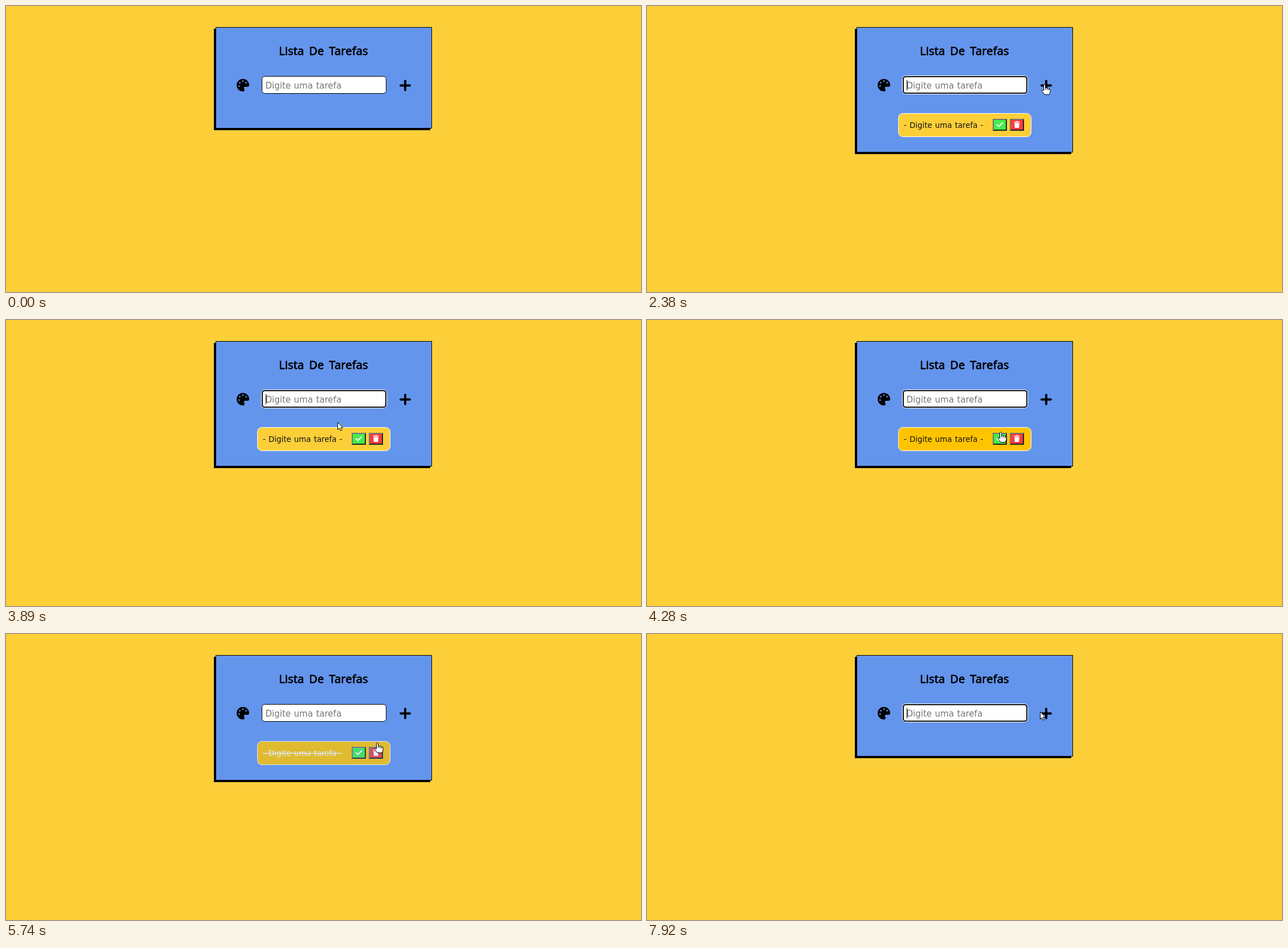
Recreate the animation shown at these times as an HTML page. Size 1115 by 502 pixels, loop 7.99 s.

```html
<!DOCTYPE html>
<html lang="pt">
<head>
<meta charset="utf-8">
<title>Lista De Tarefas</title>
<style>
  html, body { margin: 0; height: 100%; overflow: hidden; background: #fccf39; }
  svg { display: block; width: 1115px; height: 502px; }
  text { font-family: "DejaVu Sans", sans-serif; }
  .title { font: 20px "Open Sans", sans-serif; letter-spacing: .2px; word-spacing: 3.5px; stroke: #000; stroke-width: .8; stroke-linejoin: round; }
  .placeholder { font-size: 15px; word-spacing: .8px; fill: #757575; }
  .label { font-size: 13.333px; word-spacing: 1px; fill: #111; }
  .line { fill: none; stroke: #000; }
  .round { stroke-linecap: round; stroke-linejoin: round; }
  .shadow { filter: blur(.7px); }
  .bevel { fill: none; stroke-width: 2; }
  .lit { stroke: #767676; }
  .dark { stroke: #222; }
  .pressed .lit { stroke: #222; }
  .pressed .dark { stroke: #767676; }
  .done { opacity: .8; }
  .done .label { fill: #fff; text-decoration: line-through; }
  .pointer { fill: #fff; stroke: #000; stroke-linejoin: round; }
</style>
</head>
<body>
<svg viewBox="0 0 1115 502">
  <defs>
    <g id="bevel" class="bevel">
      <path class="dark" d="M0 20H24V0"/>
      <path class="lit" d="M1 20V1H24"/>
    </g>
  </defs>

  <rect id="shadow" class="shadow" x="365" y="40" width="380"/>
  <rect id="card" x="368.5" y="37.5" width="379" fill="#6495ed" stroke="#000"/>
  <text class="title" x="557.5" y="86" text-anchor="middle">Lista De Tarefas</text>

  <g id="palette" transform="translate(416 139)">
    <path d="M0-11A11 11 0 1 0 0 11C3 11 3.5 8.5 2.3 6.5S2 2.8 4 2.8H8Q11 2.8 11 0A11 11 0 0 0 0-11Z"/>
  </g>
  <path class="line round" stroke-width="4" d="M693 139.5H709M701 131.5V147.5"/>

  <rect x="449.5" y="123.5" width="218" height="30" rx="5" fill="#fff" stroke="#000"/>
  <g id="focus" class="line">
    <rect x="448.5" y="122.5" width="220" height="32" rx="6" stroke="#fff"/>
    <rect x="450" y="124" width="217" height="29" rx="4.5" stroke="#101010" stroke-width="2"/>
  </g>
  <text class="placeholder" x="455.5" y="145">Digite uma tarefa</text>
  <rect id="caret" x="456" y="130" width="1" height="18"/>

  <g id="item">
    <rect id="itemBox" x="441.5" y="188.5" width="233" height="41" rx="8" stroke="#fff"/>
    <text class="label" x="451" y="213.5">- Digite uma tarefa -</text>
    <g id="check" transform="translate(607 198)">
      <rect width="25" height="21" fill="#42ee48"/>
      <use href="#bevel"/>
      <path class="round" d="M7.8 10.5L11 13.6L17.2 7" fill="none" stroke="#fff" stroke-width="2.2"/>
    </g>
    <g id="trash" transform="translate(637 198)">
      <rect width="25" height="21" fill="#f83c3c"/>
      <use href="#bevel"/>
      <path fill="#fff" d="M7.5 5H10.5L11 4.2H14L14.5 5H17.5V6.6H7.5ZM8.2 7.4H16.8L16.2 16H8.8Z"/>
    </g>
  </g>

  <g id="cursor">
    <path id="arrow" class="pointer" d="M.5 .5V13.5L3.4 10.8L5.4 15.3L7.6 14.3L5.7 10H9.5Z"/>
    <path id="hand" class="pointer" d="M-1.5 1.7Q0-.7 1.5 1.7V6.5Q3.5 5.5 4.5 7.2Q6.5 6.4 7.5 8.2Q10 7.5 10 10V14L8.5 18.5H0L-4.5 12.5Q-5 10.3-3 10.5L-1.5 12ZM1.5 6.5V10M4.5 7.2V10.5M7.5 8.2V11"/>
    <path id="beam" class="line" d="M-3-7.5H4M.5-7V7M-3 7.5H4"/>
  </g>
</svg>
<script>
const LOOP = 7990, STEP = 80, LIFT = 20, BLINK = 510;
const ADDED = 2380, CHECK_DOWN = 4740, CHECK_UP = 4970, TRASH_DOWN = 6440, REMOVED = 6610;

// Each glide ends at (x, y); the pointer rests there until the next one starts
const glides = [
  { start: 150, end: 150, x: 1009, y: 396 },
  { start: 230, end: 230, x: 863, y: 302 },
  { start: 690, end: 780, x: 607, y: 241 },
  { start: 1240, end: 1610, x: 692, y: 149 },
  { start: 1690, end: 1850, x: 698, y: 137 },
  { start: 2780, end: 3100, x: 563, y: 196 },
  { start: 3680, end: 4280, x: 621, y: 196 },
  { start: 5350, end: 5740, x: 652, y: 190 },
  { start: REMOVED, end: REMOVED, x: 650, y: 202 },
  { start: 6990, end: 7230, x: 640, y: 141 },
  { start: 7690, end: 7920, x: 690, y: 136 }
];

const el = id => document.getElementById(id);
const show = (id, on) => el(id).style.display = on ? "" : "none";
const between = (t, a, b) => t >= a && t < b;
const inside = (p, x0, y0, x1, y1) => between(p.x, x0, x1) && between(p.y, y0, y1);

// Paint wells, evenly spaced around the palette
for (let i = 0; i < 4; i++) {
  const angle = (166 + 52 * i) * Math.PI / 180;
  const well = document.createElementNS("http://www.w3.org/2000/svg", "circle");
  const shape = { cx: 7 * Math.cos(angle), cy: 7 * Math.sin(angle), r: 1.4, fill: "#6495ed" };
  for (const key in shape) well.setAttribute(key, shape[key]);
  el("palette").append(well);
}

// Glides advance in even steps and arch slightly upwards
function pointerAt(t) {
  let p = { x: -99, y: -99 };
  for (const { start, end, x, y } of glides) {
    if (t < start) break;
    const gaps = Math.round((end - start) / STEP);
    const done = end > start ? Math.floor((t - start) / (end - start) * gaps + 1e-6) : 0;
    const u = Math.min(1, (done + 1) / (gaps + 1));
    p = {
      x: Math.round(p.x + (x - p.x) * u),
      y: Math.round(p.y + (y - p.y) * u - LIFT * Math.sin(Math.PI * u))
    };
  }
  return p;
}

function draw(t) {
  const hasItem = between(t, ADDED, REMOVED);
  const focused = between(t, ADDED, CHECK_DOWN) || t >= REMOVED;
  const focusAge = t - (t >= REMOVED ? REMOVED : ADDED);
  const p = pointerAt(t);
  const onItem = hasItem && inside(p, 441, 188, 675, 230);
  const onInput = inside(p, 449, 123, 668, 154);
  const onHand = onItem || inside(p, 693, 128, 712, 149);

  const height = hasItem ? 219 : 177;
  el("card").setAttribute("height", height);
  el("shadow").setAttribute("height", height + 1);
  show("focus", focused);
  show("caret", focused && focusAge % (2 * BLINK) < BLINK);

  show("item", hasItem);
  el("item").classList.toggle("done", t >= CHECK_UP);
  el("itemBox").setAttribute("fill", onItem ? "#ffc400" : "#fccf39");
  el("check").classList.toggle("pressed", between(t, CHECK_DOWN, CHECK_UP));
  el("trash").classList.toggle("pressed", between(t, TRASH_DOWN, REMOVED));

  el("cursor").setAttribute("transform", `translate(${p.x} ${p.y})`);
  show("hand", onHand);
  show("beam", onInput);
  show("arrow", !onHand && !onInput);
}

const origin = performance.now();
function tick() {
  draw((performance.now() - origin) % LOOP);
  requestAnimationFrame(tick);
}
tick();
</script>
</body>
</html>
```
